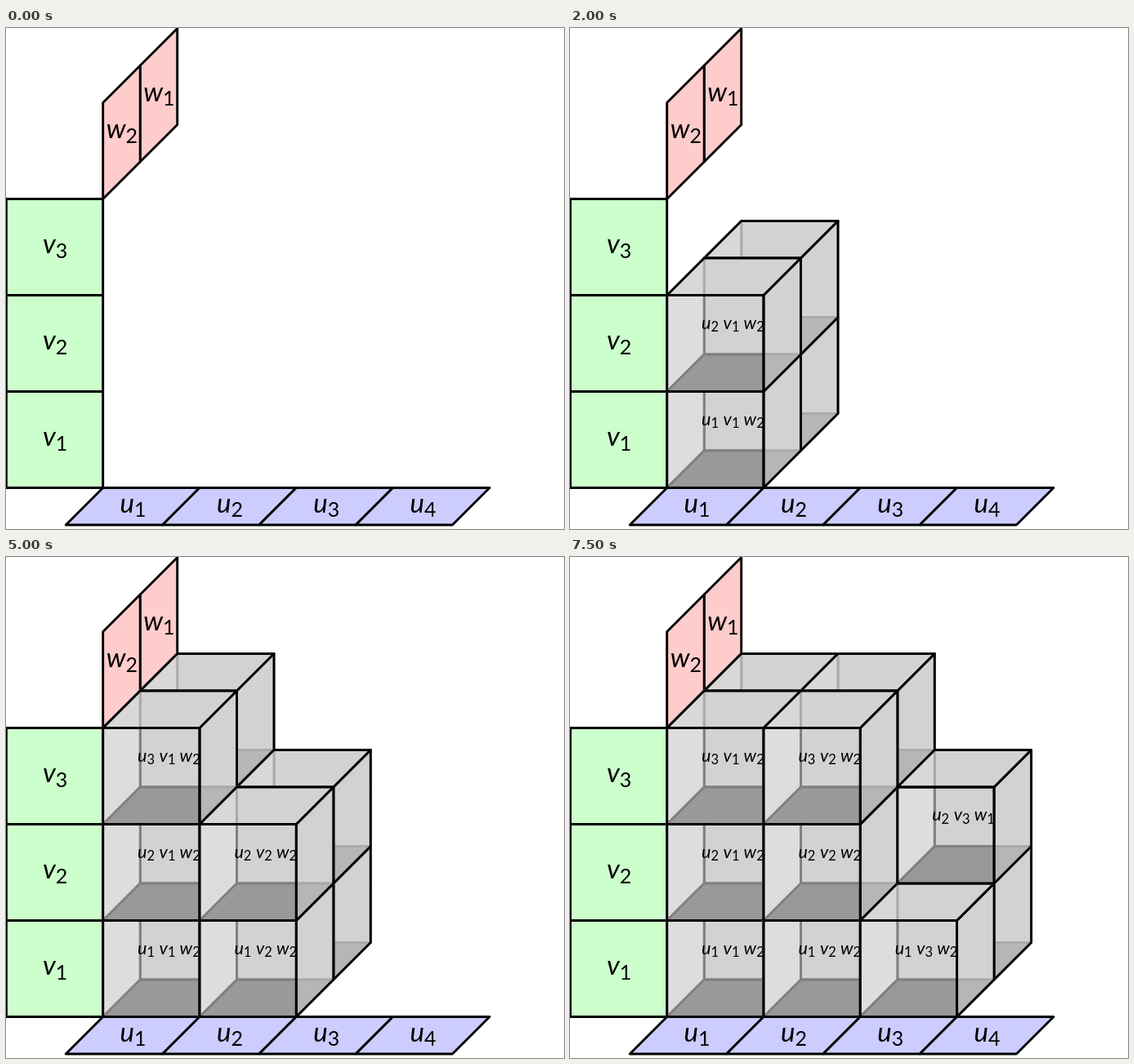
An HTML page that plays this animation: 683x614 px, repeating every 8 s.

```html
<!DOCTYPE html>
<html lang="en">
<head>
<meta charset="utf-8">
<title>Building a tensor from three vectors</title>
<style>
  html, body { margin: 0; width: 100%; height: 100%; overflow: hidden; background: #fff; }
  svg { display: block; }
  polygon { stroke: #000; stroke-width: 2.9; stroke-linejoin: round; }
  text { font-family: Lato, "Open Sans", sans-serif; font-size: 33px; fill: #000; }
  .var { font-style: italic; }
  .sub { font-size: 25px; }
  .small { font-size: 21.5px; }
  .small .sub { font-size: 16.5px; }
  .u { fill: #ccccff; }
  .v { fill: #ccffcc; }
  .w { fill: #ffcccc; }
  .side, .rear, .floor { stroke: #808080; }
  .side { fill: #ddd; }
  .rear { fill: #d2d2d2; }
  .floor { fill: #999; }
  .glass { fill: #d4d4d4; fill-opacity: .5; }
  .front { fill: none; }
</style>
</head>
<body>
<svg id="stage" width="683" height="614" viewBox="0 0 683 614"></svg>
<script>
const X0 = 118.7, Y0 = 563.5, WIDTH = 118.3, HEIGHT = 118, DEPTH = 45.5;
const STEP = 500, LOOP = 8000, ROWS = 3;
const stage = document.getElementById('stage');

// Grid point: x to the right, y up, z away from the viewer.
const project = (x, y, z) => [X0 + x * WIDTH + z * DEPTH, Y0 - y * HEIGHT - z * DEPTH];

function add(parent, tag, attrs, text = '') {
  const el = document.createElementNS('http://www.w3.org/2000/svg', tag);
  for (const key in attrs) el.setAttribute(key, attrs[key]);
  el.textContent = text;
  return parent.appendChild(el);
}

// Parallelogram from corner p spanned by the directions a and b.
function face(parent, cls, p, a, b) {
  const corner = (i, j) => project(...p.map((v, k) => v + i * a[k] + j * b[k]));
  const points = [corner(0, 0), corner(1, 0), corner(1, 1), corner(0, 1)].join(' ');
  add(parent, 'polygon', { class: cls, points });
}

function label(parent, name, index, x, y, drop, attrs) {
  const text = add(parent, 'text', { x, y, ...attrs });
  add(text, 'tspan', { class: 'var' }, name);
  add(text, 'tspan', { class: 'sub', dy: drop }, index);
}

const RIGHT = [1, 0, 0], UP = [0, 1, 0], BACK = [0, 0, 1];

function vectorCell(name, index, p, a, b) {
  face(stage, name, p, a, b);
  const [x, y] = project(...p.map((v, k) => v + (a[k] + b[k]) / 2));
  label(stage, name, index, x + .5, y + 7.7, 5.3, { 'text-anchor': 'middle' });
}

function cube(col, row, z) {
  const g = add(stage, 'g', { visibility: 'hidden' });
  const p = [col, row, z];
  face(g, 'rear', [col, row, z + 1], RIGHT, UP);
  face(g, 'side', p, BACK, UP);
  face(g, 'floor', p, RIGHT, BACK);

  const [x, y] = project(col + .5, row + .5, z + .5);
  const parts = [['u', row + 1, -39.5], ['v', col + 1, -13], ['w', 2 - z, 12]];
  for (const [name, index, dx] of parts)
    label(g, name, index, x + dx, y + 4.8, 3.6, { class: 'small' });

  face(g, 'glass', [col + 1, row, z], BACK, UP);
  face(g, 'glass', [col, row + 1, z], RIGHT, BACK);
  face(g, 'front', p, RIGHT, UP);
  return g;
}

for (let i = 0; i < 4; i++) vectorCell('u', i + 1, [i, 0, -1], RIGHT, BACK);
for (let i = 0; i < 3; i++) vectorCell('v', i + 1, [-1, i, 0], RIGHT, UP);
for (let i = 0; i < 2; i++) vectorCell('w', i + 1, [0, 3, 1 - i], BACK, UP);

// Column by column, bottom to top, back cube before front cube.
const cubes = Array.from({ length: LOOP / STEP - 1 }, (_, i) => {
  const pair = Math.floor(i / 2);
  return cube(Math.floor(pair / ROWS), pair % ROWS, 1 - i % 2);
});

const start = performance.now();
function draw() {
  const shown = Math.floor((performance.now() - start) % LOOP / STEP);
  cubes.forEach((g, i) => g.setAttribute('visibility', i < shown ? 'visible' : 'hidden'));
  requestAnimationFrame(draw);
}
draw();
</script>
</body>
</html>
```
